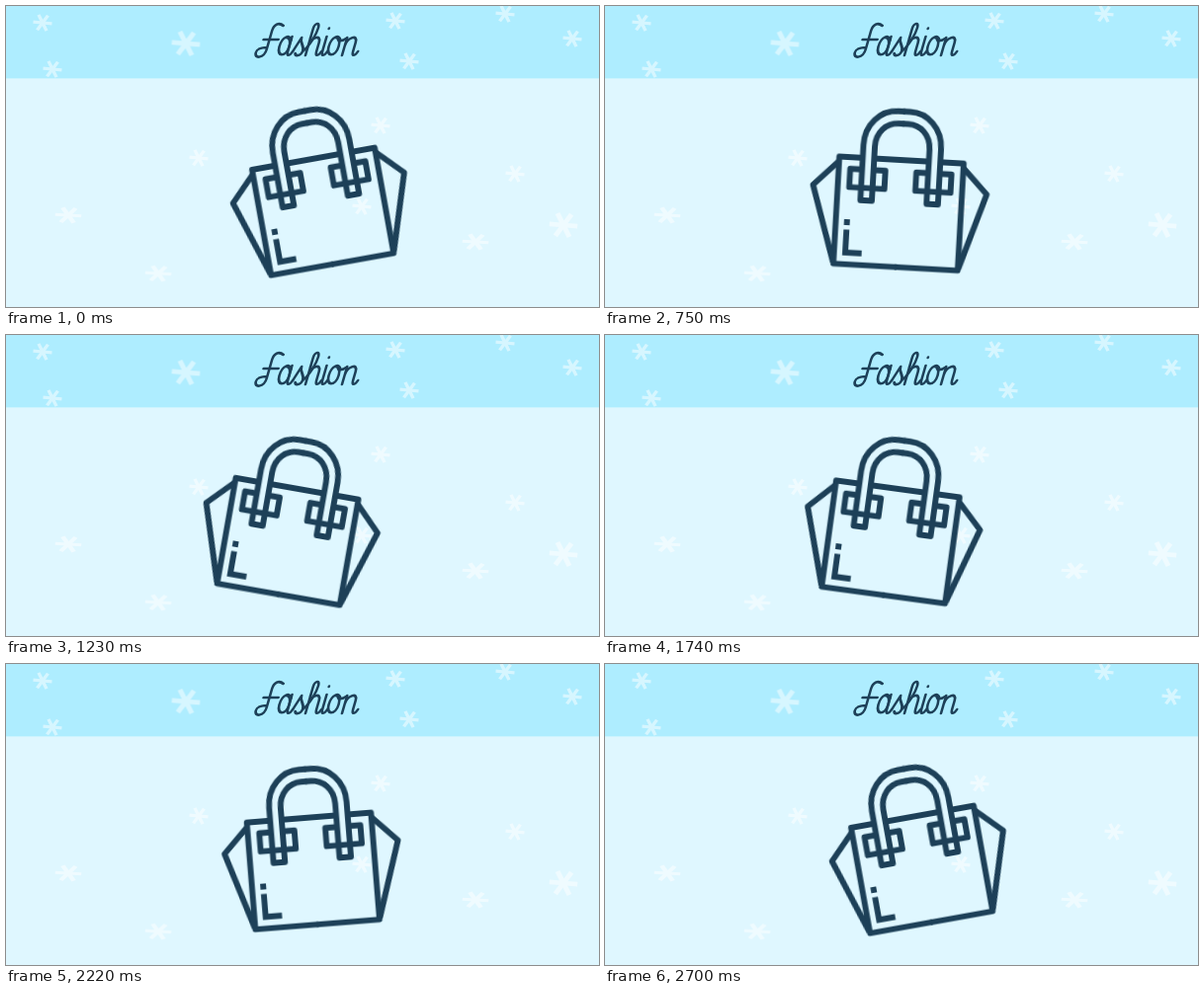
An HTML page that plays this animation: 600x305 px, repeating every 2730 ms.

```html
<!DOCTYPE html>
<html lang="en">
<head>
<meta charset="utf-8">
<title>fashion</title>
<style>
  html, body { margin: 0; width: 100%; height: 100%; overflow: hidden; background: #dff7ff; }
  svg { display: block; width: 600px; height: 305px; }
  .ink { fill: none; stroke: #1d4058; stroke-linejoin: round; }
  .bag { --tilt: 10.2deg; stroke-width: 5.9; transform-origin: 300px 109px; animation: swing 2730ms infinite; }
  .word { stroke-width: 2.6; stroke-linecap: round; }
  .snow { stroke: #fff; stroke-width: 3.4; opacity: .5; }
  @keyframes swing {
    0% { transform: rotate(calc(-1 * var(--tilt))); animation-timing-function: cubic-bezier(.48, 0, .45, 1); }
    49.6% { transform: rotate(var(--tilt)); animation-timing-function: cubic-bezier(.55, 0, .52, 1); }
    99.2%, 100% { transform: rotate(calc(-1 * var(--tilt))); }
  }
</style>
</head>
<body>
<svg viewBox="0 0 600 305" role="img" aria-label="fashion">
  <defs>
    <path id="bowl" d="M5 -15C2 -22 -5 -19 -5 -9C-5 2 5 2 5 -9C5 -14 3 -18 0 -18"/>
    <path id="stem" d="M0 -19V-4C0 1 3 1 5 -4"/>
    <path id="arch" d="M0 0V-18M0 -9C0 -18 10 -22 10 -13V-4C10 1 13 1 15 -4"/>
    <g id="half">
      <path d="M-1 155.6H63V47H39.3M27.7 47H-1"/>
      <path d="M63.5 52L88 77L63.5 154"/>
      <path d="M-1 -2.2H6C24 -2.2 39.3 13 39.3 34V90H27.7V35C27.7 20 17 10.2 5 10.2H-1"/>
      <path d="M39.3 58.8H51.3V77.4H15.7V58.8H27.7"/>
    </g>
  </defs>

  <rect width="600" height="73.4" fill="#aeedff"/>
  <g id="snow" class="snow"></g>

  <g class="ink word" transform="translate(249 50) skewX(-16)">
    <path d="M23 -30C17 -34 13 -31 13 -25V-6C13 3 3 4 3 -3C3 -7 8 -8 13 -8M7 -16H22"/>
    <use href="#bowl" x="30"/>
    <use href="#stem" x="35"/>
    <path d="M40 -4L45 -18C44 -13 51 -9 50 -4C49 1 44 1 43 -2"/>
    <path d="M50 -4C56 -10 59 -22 59 -28C59 -34 54 -33 54 -27V-18"/>
    <use href="#arch" x="54"/>
    <use href="#stem" x="70"/>
    <path d="M70 -27V-27.5"/>
    <use href="#bowl" x="80"/>
    <path d="M82 -18C82 -14 87 -14 90 -17"/>
    <use href="#arch" x="91"/>
  </g>

  <g class="ink bag">
    <g transform="translate(302.7 109)">
      <use href="#half"/>
      <use href="#half" transform="scale(-1 1)"/>
      <path d="M-51.6 110V116M-51.6 120.5V143.8H-35" stroke-linejoin="miter"/>
    </g>
  </g>
</svg>
<script>
  const arms = Array.from({ length: 6 }, (_, i) =>
    `<path d="M0 0V-9.5" transform="rotate(${35 + i * 60})"/>`).join('');
  const flakes = (scale, points) => points.map(([x, y]) =>
    `<g transform="translate(${x} ${y}) scale(${scale})">${arms}</g>`).join('');

  document.getElementById('snow').innerHTML =
    flakes('1 .95', [[37, 17], [47, 64], [394, 15], [505, 8], [573, 33], [408, 56],
      [195, 154], [379, 121], [360, 203], [515, 170]]) +
    flakes('1.4 .9', [[63, 212], [154, 271], [475, 239]]) +
    flakes('1.5 1.4', [[182, 38], [564, 222]]);
</script>
</body>
</html>
```
